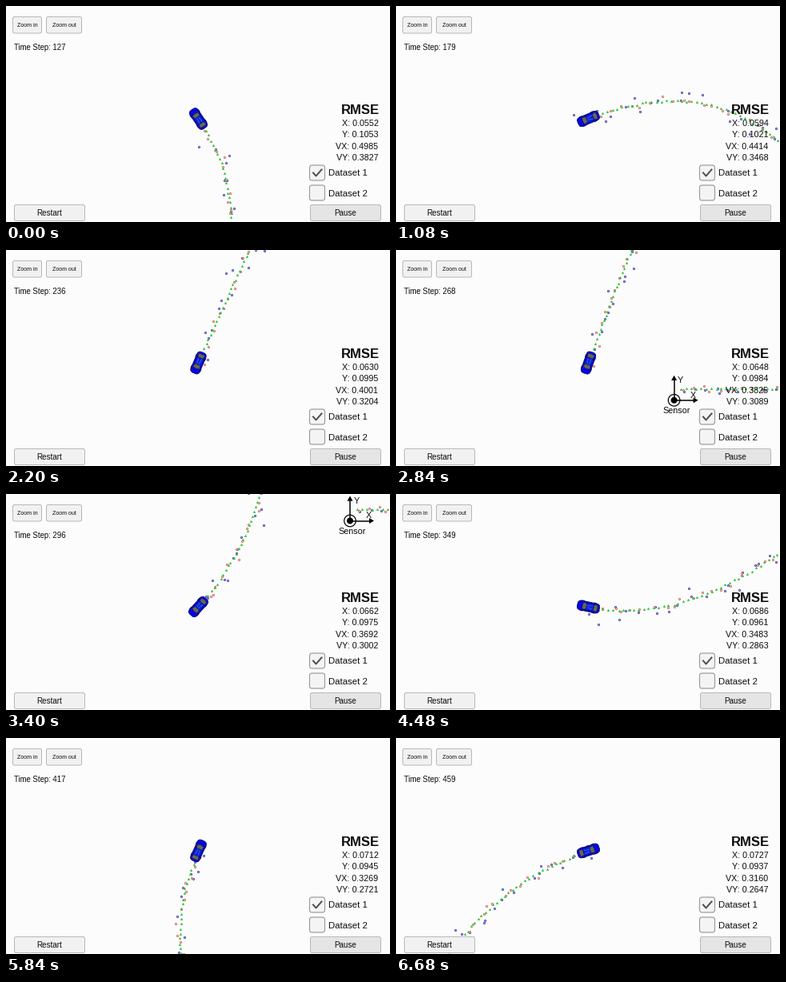
Write a matplotlib script that moves like this. It is 480x270 px and loops after 6.72 s.

```python
import numpy as np
import matplotlib
import matplotlib.pyplot as plt
from matplotlib.animation import FuncAnimation
from matplotlib.patches import Circle, FancyBboxPatch, Polygon
from matplotlib.transforms import Affine2D

W, H, DPI = 480, 270, 72          # at 72 dpi one point is one pixel
FRAMES, INTERVAL = 168, 40
START, END = 127, 459             # first and last time step on show
CAR = np.array([240.5, 141.0])    # the camera keeps the car here
SPEED = 6.3                       # pixels per time step
INK = "#0c0c0c"

matplotlib.rcParams["font.family"] = "Liberation Sans"
fig = plt.figure(figsize=(W / DPI, H / DPI), dpi=DPI, facecolor="#fcfcfc")
ax = fig.add_axes([0, 0, 1, 1])
ax.set_xlim(0, W)
ax.set_ylim(H, 0)
ax.axis("off")

# Figure-eight drive: (time step, heading in degrees, y up)
TURNS = [(0, 0), (34, 0), (106, 93), (127, 124), (146, 150), (161, 180),
         (179, 203), (210, 244), (274, 251), (296, 228), (318, 209),
         (335, 191), (349, 168), (362, 156), (377, 122), (426, 53), (459, 18)]
heading = np.radians(np.interp(np.arange(END + 1), *zip(*TURNS)))
mid = (heading[1:] + heading[:-1]) / 2
path = np.zeros((END + 1, 2))
path[1:] = SPEED * np.cumsum(np.c_[np.cos(mid), -np.sin(mid)], axis=0)
sensor_at = path[296] + (189.5, -107.5)

# Lidar scatters evenly; radar scatters in range and, far away, in bearing
rng = np.random.default_rng(7)
estimate = path + rng.normal(0, 0.6, path.shape)
lidar = path + rng.normal(0, 2.6, path.shape)
ray = path - sensor_at
reach = np.hypot(*ray.T)
bearing = np.arctan2(ray[:, 1], ray[:, 0]) + rng.normal(0, 0.02, len(path))
reach = reach + rng.normal(0, 6, len(path))
radar = sensor_at + np.c_[reach * np.cos(bearing), reach * np.sin(bearing)]


def trail(marker, size, edge, face, z):
    return ax.plot([], [], marker, ms=size, mec=edge, mfc=face, mew=0.8,
                   zorder=z)[0]


blue = trail("o", 2.2, "#3030ac", "#c4c4ec", 2)
red = trail("o", 2.2, "#d85048", "#fbeaea", 2)
green = trail("^", 2.1, "#2fc43a", "#2fc43a", 3)


def label(x, y, s, size, ha="center", z=12, **kw):
    return ax.text(x, y, s, size=size, ha=ha, va="baseline", color=INK,
                   zorder=z, **kw)


def box(x0, y0, x1, y1, fill="#f1f1f1", r=2.2, edge="#b8b8b8", lw=1):
    ax.add_patch(FancyBboxPatch(
        (x0 + 0.5, y0 + 0.5), x1 - x0 - 1, y1 - y0 - 1,
        boxstyle=f"round,pad=0,rounding_size={r}", fc=fill, ec=edge,
        lw=lw, zorder=10))


def button(x0, y0, x1, y1, s, size, fill="#f1f1f1"):
    box(x0, y0, x1, y1, fill)
    label((x0 + x1) / 2, (y0 + y1) / 2 + size * 0.36, s, size)


button(8, 13, 45, 34.5, "Zoom in", 7)
button(50, 13, 95, 34.5, "Zoom out", 7)
button(10, 248, 99, 269, "Restart", 9.9)
button(380, 248, 469, 269, "Pause", 9.9, "#e5e5e5")
for k, top in enumerate((198.5, 223.5), 1):
    box(379, top, 399, top + 20, "#f4f4f4", 3.2, "#9c9c9c", 1.2)
    label(403, top + 14, f"Dataset {k}", 11.4, "left")
ax.plot([384, 387.5, 394.5], [208.5, 212.5, 204.5], color="#505050", lw=2,
        zorder=11)
clock = label(10.5, 54.6, "", 9.6, "left")
label(466.5, 135.2, "RMSE", 16.6, "right", weight="bold")

# Errors follow a power law between their first and last values
ERRORS = {"X": (0.0552, 0.0727), "Y": (0.1053, 0.0937),
          "VX": (0.4985, 0.3160), "VY": (0.3827, 0.2647)}
readouts = {name: label(465.5, 150.2 + 14.3 * k, "", 10.8, "right")
            for k, name in enumerate(ERRORS)}


def error(name, now):
    first, last = ERRORS[name]
    return first * (last / first) ** (np.log(now / START) / np.log(END / START))


# Sensor origin with its axes
sensor_tf = Affine2D()
on_sensor = sensor_tf + ax.transData


def sensor_part(shape):
    shape.set(transform=on_sensor, zorder=5)
    ax.add_patch(shape)


sensor_part(Circle((0, 0), 7.3, fc="none", ec="black", lw=1.2))
sensor_part(Circle((0, 0), 4, fc="black", ec="none"))
for tip, wing in (((0, -31), (3.5, 0)), ((30, 0), (0, 3.5))):
    tip, wing = np.array(tip), np.array(wing)
    base = tip * 0.8
    ax.plot(*zip((0, 0), base), color="black", lw=1.5, transform=on_sensor,
            zorder=5)
    sensor_part(Polygon([tip, base + wing, base - wing], fc="black",
                        ec="none"))
for x, y, s in ((8, -21.5, "Y"), (23.5, -3, "X"), (3, 16.5, "Sensor")):
    label(x, y, s, 10.8, z=5, transform=on_sensor, clip_on=True)

# Car seen from above, nose along +x
car_tf = Affine2D()
on_car = car_tf + ax.transData


def car_part(shape):
    shape.set(transform=on_car, zorder=6)
    ax.add_patch(shape)


def rounded(x, y, w, h, r, fc, ec="none", lw=0.8):
    car_part(FancyBboxPatch((x, y), w, h, fc=fc, ec=ec, lw=lw,
                            boxstyle=f"round,pad=0,rounding_size={r}"))


def window(x, depth):
    car_part(Polygon([(x, -3.4), (x + depth, -4.4), (x + depth * 1.2, 0),
                      (x + depth, 4.4), (x, 3.4)],
                     fc="#66665a", ec="#20203c", lw=0.6))


for x in (-9.5, 5.5):
    rounded(x, -6.8, 4.5, 13.6, 1, "#101038")
rounded(-14, -6, 28, 12, 4.5, "#0606e0", "#040470")
rounded(-6.5, -4.6, 10, 9.2, 2, "#0c20d8", "#060a80", 0.7)
window(2.5, 4.4)
window(-6.6, -4.2)
for y in (-2, 2):
    ax.plot([-5, 1], [y, y * 0.6], color="#3c64ee", lw=0.9, transform=on_car,
            zorder=6)


def update(i):
    k = max(i - 1, 0)
    # two steps per picture, one step ahead for a while
    now = START + 2 * k + (40 <= k < 100)
    shift = CAR - path[now]
    for line, pts, first, stride in ((green, estimate, 0, 1),
                                     (red, lidar, 0, 2), (blue, radar, 1, 2)):
        line.set_data(*(pts[first:now + 1:stride] + shift).T)
    sensor_tf.clear().translate(*(sensor_at + shift))
    car_tf.clear().rotate(-heading[now]).translate(*CAR)
    clock.set_text(f"Time Step: {now}")
    for name, text in readouts.items():
        text.set_text(f"{name}: {error(name, now):.4f}")
    return []


anim = FuncAnimation(fig, update, frames=FRAMES, interval=INTERVAL,
                     repeat=True, repeat_delay=0, blit=False)
plt.show()
```
